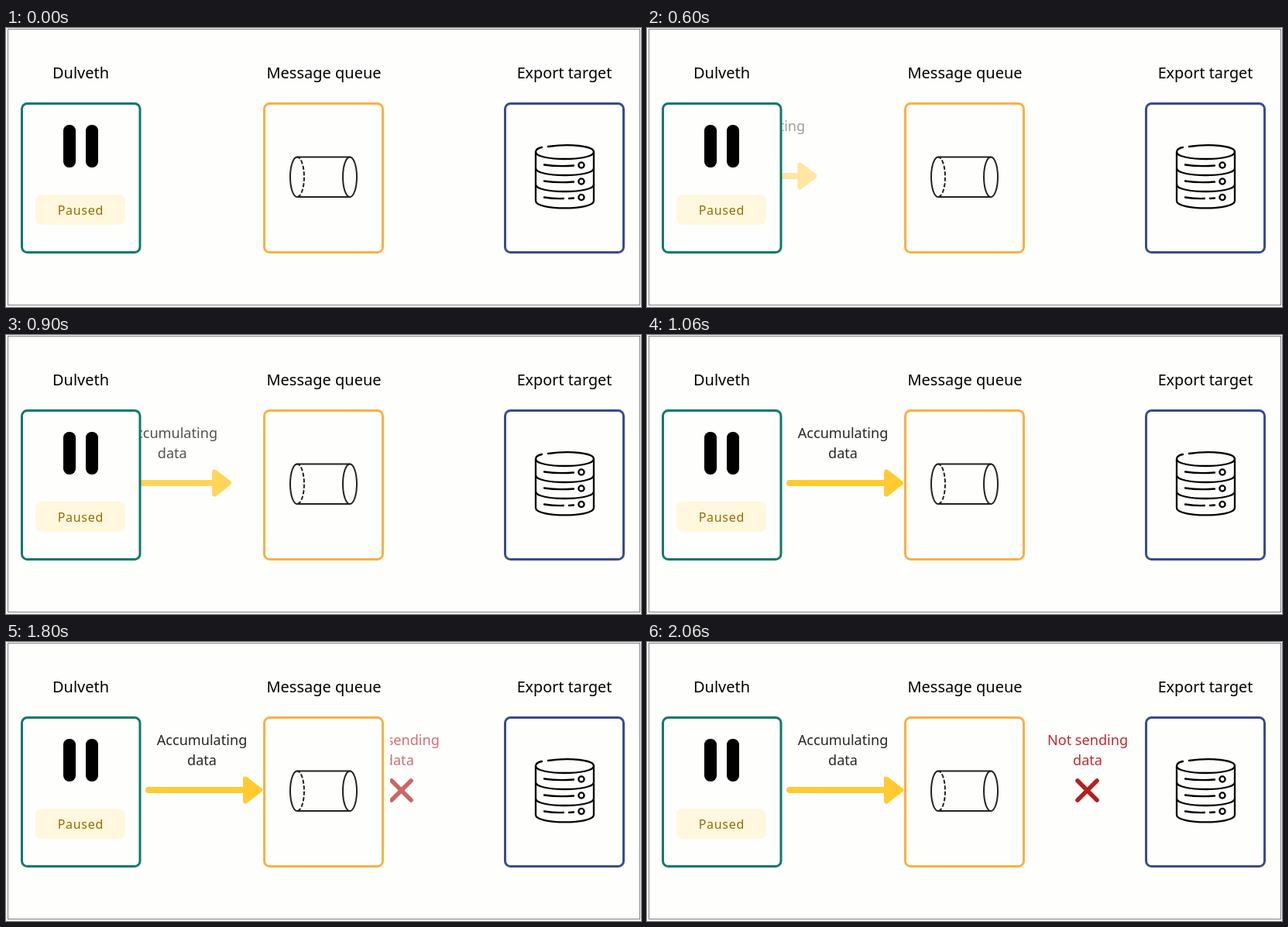
These frames come from a looping animation (820 px wide and 360 px high, 3 s). An HTML page:

```html
<!DOCTYPE html>
<html lang="en">
<head>
<meta charset="utf-8">
<title>Paused stream</title>
<style>
  html, body { margin: 0; width: 100%; height: 100%; overflow: hidden; background: #fff; }
  svg { display: block; width: 820px; height: 360px; }
  text { font-family: "Noto Sans", "Open Sans", sans-serif; text-anchor: middle; }
  .title { font-size: 20px; fill: #000; }
  .label { font-size: 18.1px; }
  .badge { font-size: 16px; letter-spacing: .7px; fill: #946c00; }
  .card { fill: #fefefd; stroke-width: 3; }
  .line { fill: none; stroke-linecap: round; stroke-linejoin: round; }
</style>
</head>
<body>
<svg viewBox="0 0 820 360">
  <defs>
    <clipPath id="afterSource"><rect x="173" y="100" width="165" height="125"/></clipPath>
    <clipPath id="afterQueue"><rect x="496" y="100" width="145" height="125"/></clipPath>
  </defs>

  <rect x="2.5" y="1.5" width="816" height="356" fill="#fefefd" stroke="#7f7f7f"/>

  <text class="title" x="96.5" y="65">Dulveth</text>
  <text class="title" x="410.5" y="65">Message queue</text>
  <text class="title" x="721" y="65" style="font-size:19.8px">Export target</text>

  <rect class="card" x="333.5" y="97.5" width="153" height="192" rx="7" stroke="#fbb040"/>
  <rect class="card" x="644.5" y="97.5" width="153" height="192" rx="7" stroke="#3a4b8c"/>

  <g clip-path="url(#afterSource)">
    <g class="label" id="gatherText" fill="#262626">
      <text x="253" y="133">Accumulating</text>
      <text x="253" y="159">data</text>
    </g>
    <g class="line" id="arrow" stroke="#ffcb31">
      <path d="M184 191H310" stroke-width="8"/>
      <path d="M309 176.5L328 191L309 205.5Z" fill="#ffcb31" stroke-width="6"/>
    </g>
  </g>

  <g clip-path="url(#afterQueue)">
    <g class="label" id="blockedText" fill="#bf2a33">
      <text x="569" y="133">Not sending</text>
      <text x="569" y="159">data</text>
    </g>
    <path class="line" id="cross" d="M556 179L581 204M581 179L556 204" stroke="#b32020" stroke-width="5.6"/>
  </g>

  <rect class="card" x="20.5" y="97.5" width="152.5" height="192" rx="7" stroke="#0b7a66"/>
  <rect x="74" y="125" width="16" height="55" rx="7.5"/>
  <rect x="103" y="125" width="16" height="55" rx="7.5"/>
  <rect x="38" y="215" width="116" height="39" rx="8" fill="#fff7de"/>
  <text class="badge" x="96.3" y="241">Paused</text>

  <g class="line" stroke="#222" stroke-width="2">
    <path d="M444 166.5H376A9 25.75 0 0 0 376 218H444"/>
    <path d="M376 166.5A9 25.75 0 0 1 376 218" stroke-dasharray="3.5 4"/>
    <ellipse cx="444" cy="192.25" rx="9" ry="25.75"/>
  </g>

  <g class="line" stroke="#000" stroke-width="2.3">
    <path d="M700 153C728 149 759 152 759 160C759 172 684 172 684 160C684 157 687 155 692 154"/>
    <path d="M684 160V223C684 235.5 759 235.5 759 223V160"/>
    <path d="M684 181C684 193 759 193 759 181M684 202C684 214 759 214 759 202"/>
    <path d="M695 176.5Q712 179 733 177.5M695 197.5Q712 200 733 198.5M695 218.5Q708 220.5 720 220M727 220L733 219.5"/>
    <circle cx="743" cy="177" r="3.6"/>
    <circle cx="743" cy="198" r="3.6"/>
    <circle cx="743" cy="218.5" r="3.6"/>
  </g>
</svg>
<script>
  const LOOP = 3000;
  const FADE = 0.04;

  // Parts slide right by `speed` px per tick and rest from tick `last` on.
  const parts = [
    { id: "gatherText", first: 13, last: 32, speed: 7.65 },
    { id: "arrow", first: 13, last: 32, speed: 7.97 },
    { id: "blockedText", first: 46, last: 62, speed: 7.65 },
    { id: "cross", first: 46, last: 62, speed: 7.25 }
  ].map(part => ({ ...part, node: document.getElementById(part.id) }));

  // 30 ticks per second, each starting on a whole hundredth of a second.
  const tickAt = ms => Math.ceil(3 * (Math.floor(ms / 10) + 1) / 10) - 1;

  function draw(ms) {
    const tick = tickAt(ms % LOOP);
    for (const { node, first, last, speed } of parts) {
      const left = Math.max(0, last - tick);
      node.setAttribute("visibility", tick < first ? "hidden" : "visible");
      node.setAttribute("transform", `translate(${-left * speed} 0)`);
      node.setAttribute("opacity", Math.max(0, 1 - left * FADE));
    }
  }

  const start = performance.now();
  function loop() {
    draw(performance.now() - start);
    requestAnimationFrame(loop);
  }
  loop();
</script>
</body>
</html>
```
